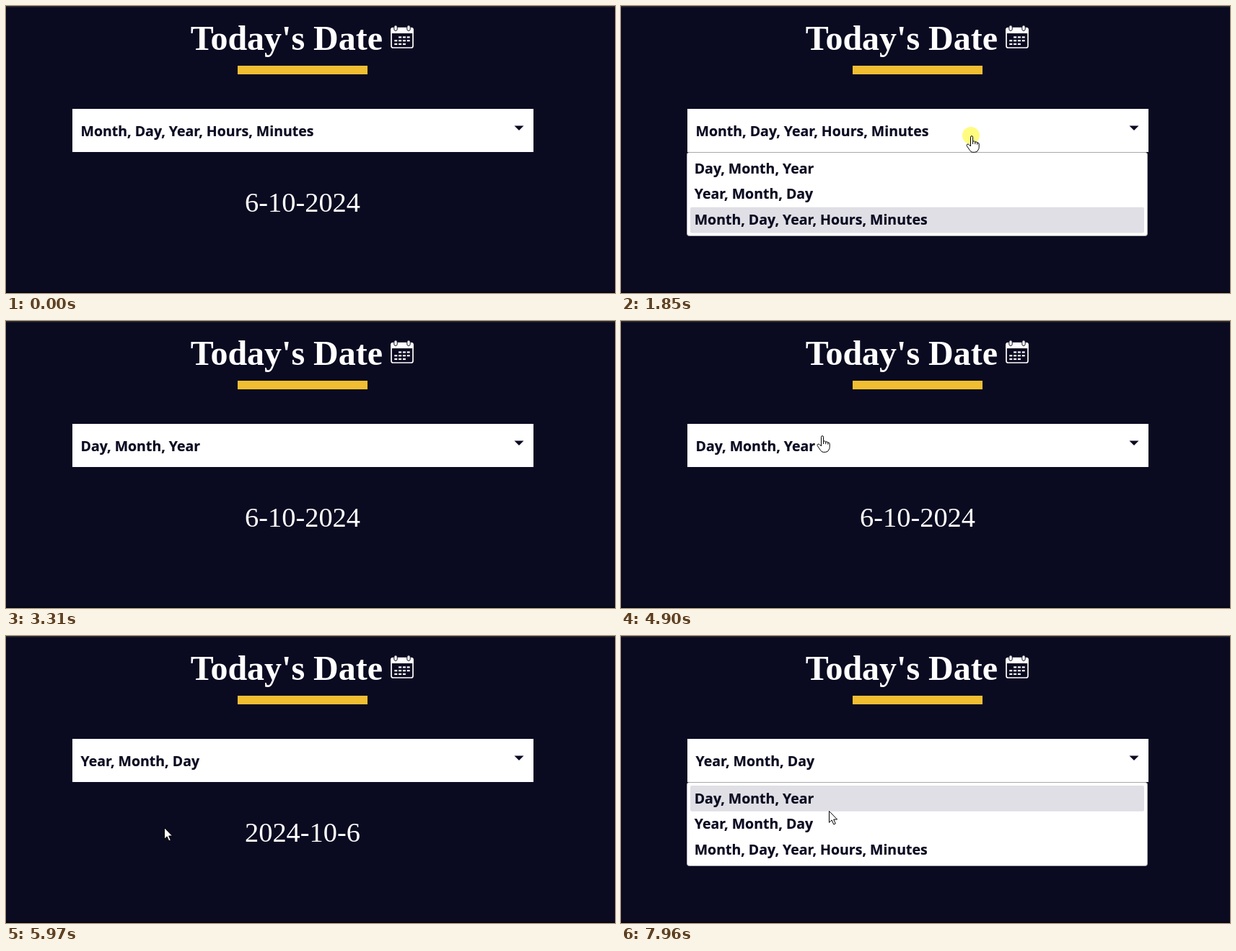
These frames come from a looping animation (844x399 px, 8000 ms). An HTML page:

```html
<!DOCTYPE html>
<html lang="en">
<head>
<meta charset="utf-8">
<title>Today's Date</title>
<style>
  html, body { margin: 0; width: 100%; height: 100%; overflow: hidden; background: #0a0a21; }
  svg { display: block; width: 844px; height: 399px; }
  .serif { font-family: "Liberation Serif", "Times New Roman", serif; fill: #fff; }
  .label { font: bold 19.5px "Noto Sans", "Open Sans", sans-serif; fill: #0a0a21; stroke: #0a0a21; stroke-width: .2px; }
</style>
</head>
<body>
<svg viewBox="0 0 844 399">
  <rect width="844" height="399" fill="#0a0a21"/>
  <rect width="844" height="1.6" fill="#2b2b2e"/>
  <rect y="397.5" width="844" height="1.5" fill="#05050f"/>

  <text class="serif" x="255.8" y="61" font-size="48" font-weight="bold">Today's Date</text>
  <g id="calendar" fill="#fff">
    <rect x="534" y="30.5" width="30" height="27.5" rx="2.5" fill="none" stroke="#fff" stroke-width="1.7"/>
    <path d="M533.5 38V32.5Q533.5 30 536 30H562Q564.5 30 564.5 32.5V38Z"/>
    <g stroke="#0a0a21">
      <rect x="537.8" y="26.8" width="4.4" height="7.6" rx="2.2"/>
      <rect x="555.8" y="26.8" width="4.4" height="7.6" rx="2.2"/>
    </g>
  </g>
  <rect x="321" y="83" width="180" height="12" fill="#f1be32"/>

  <text class="serif" id="date" x="411" y="286" font-size="38.4" text-anchor="middle"></text>

  <rect x="92" y="143" width="639" height="60" fill="#fff"/>
  <text class="label" id="chosen" x="103.5" y="180.5"></text>
  <path d="M704.5 166.5h13l-6.5 6.5z" fill="#0a0a21"/>

  <g id="menu">
    <rect x="91.5" y="203.5" width="638" height="116" rx="3" fill="#fff" stroke="#a8a8ac"/>
    <rect id="highlight" x="96" width="629" height="35.8" rx="2" fill="#dfdfe5"/>
  </g>

  <circle id="click" r="12" fill="#fffa00" fill-opacity=".5"/>
  <g id="cursor" fill="#fff" stroke="#000" stroke-linejoin="round">
    <path id="arrow" d="M.5 .5V16.3L4.1 12.9L6.8 18.9L9.3 17.8L6.7 12H11.6Z"/>
    <g id="hand" transform="translate(-.8 0)">
      <path d="M.3 2.3Q.3 .7 1.8 .7T3.4 2.3V8.2Q5.8 7.3 6.6 9Q9 8.3 9.6 10Q12 9.6 12 12V16.5Q12 18.5 10.8 20Q9.8 23.3 6 23.3H3Q.7 23.3-.7 20.7L-4.8 14.7Q-5.7 13-4.3 12.2Q-3 11.6-1.6 13L.3 15Z"/>
      <path d="M3.4 8.2V12M6.6 9V12.2M9.6 10V12.7" fill="none"/>
    </g>
  </g>
</svg>
<script>
const LOOP = 8000, FRAME = 200 / 3, CLICK = 140;
const MENU_TOP = 208, ROW = 35.9;
const OPTIONS = [
  { name: "Day, Month, Year", date: "6-10-2024" },
  { name: "Year, Month, Day", date: "2024-10-6" },
  { name: "Month, Day, Year, Hours, Minutes", date: "6-10-2024" }
];
const INITIAL = 2;

// A visit presses the field to open the menu, then picks an option.
const visits = [
  { press: 1780, pick: 2840, option: 0 },
  { press: 4960, pick: 5830, option: 1 },
  { press: 7560, pick: LOOP }
];
const absent = t => t < 1250 || (t >= 3310 && t < 4300);

// The pointer starts here and sets off for each goal at its time.
const home = { x: 455, y: 384 };
const goals = [
  { at: 1250, x: 485, y: 180 },
  { at: 2110, x: 313, y: 228 },
  { at: 3170, x: 306, y: 252 },
  { at: 3310, x: 300, y: 355 },
  { at: 4400, x: 278, y: 159 },
  { at: 5170, x: 241, y: 245 },
  { at: 5690, x: 219, y: 266 },
  { at: 6250, x: 270, y: 350 },
  { at: 6570, x: 396, y: 308 },
  { at: 7160, x: 289, y: 168 },
  { at: 7700, x: 288, y: 243 }
];

const el = id => document.getElementById(id);
const show = (node, on) => node.setAttribute("visibility", on ? "visible" : "hidden");
const place = (node, { x, y }) => node.setAttribute("transform", `translate(${x} ${y})`);

function add(parent, tag, attributes) {
  const node = document.createElementNS("http://www.w3.org/2000/svg", tag);
  for (const key in attributes) node.setAttribute(key, attributes[key]);
  return parent.appendChild(node);
}

// Longer glides take longer, with a soft start and stop.
function glide(from, to, t) {
  const dx = to.x - from.x, dy = to.y - from.y;
  const duration = 60 + 1.9 * Math.hypot(dx, dy);
  const u = Math.min(1, Math.max(0, (t - to.at) / duration));
  const eased = 0.6 * u + 0.4 * u * u * (3 - 2 * u);
  return { x: from.x + dx * eased, y: from.y + dy * eased };
}

function pointer(t) {
  const sampled = Math.floor(t / FRAME + 0.5) * FRAME;
  return goals.reduce((from, to) => glide(from, to, sampled), home);
}

for (let row = 0; row < 3; row++) {
  for (let column = 0; column < 4; column++) {
    const blank = (row === 0 && column === 0) || (row === 2 && column === 3);
    if (!blank) {
      add(el("calendar"), "rect", { x: 538.3 + 5.8 * column, y: 42.3 + 4.8 * row, width: 4, height: 2.2 });
    }
  }
}

OPTIONS.forEach(({ name }, i) => {
  add(el("menu"), "text", { class: "label", x: 101.7, y: MENU_TOP + 24.5 + ROW * i }).textContent = name;
});

function draw(t) {
  const done = visits.findLast(v => t >= v.pick + CLICK);
  const selected = done ? done.option : INITIAL;
  el("chosen").textContent = OPTIONS[selected].name;
  el("date").textContent = OPTIONS[selected].date;

  const point = pointer(t);
  const hovered = Math.floor((point.y - MENU_TOP - 2) / ROW);
  const active = hovered in OPTIONS ? hovered : selected;
  show(el("menu"), visits.some(v => t >= v.press && t < v.pick + CLICK));
  el("highlight").setAttribute("y", MENU_TOP + ROW * active);

  const overField = point.y >= 143 && point.y < 203;
  place(el("cursor"), point);
  place(el("click"), point);
  show(el("arrow"), !absent(t) && !overField);
  show(el("hand"), !absent(t) && overField);
  show(el("click"), visits.some(v => [v.press, v.pick].some(c => t >= c && t < c + CLICK)));
}

const origin = performance.now();
function tick() {
  draw((performance.now() - origin) % LOOP);
  requestAnimationFrame(tick);
}
draw(0);
requestAnimationFrame(tick);
</script>
</body>
</html>
```
